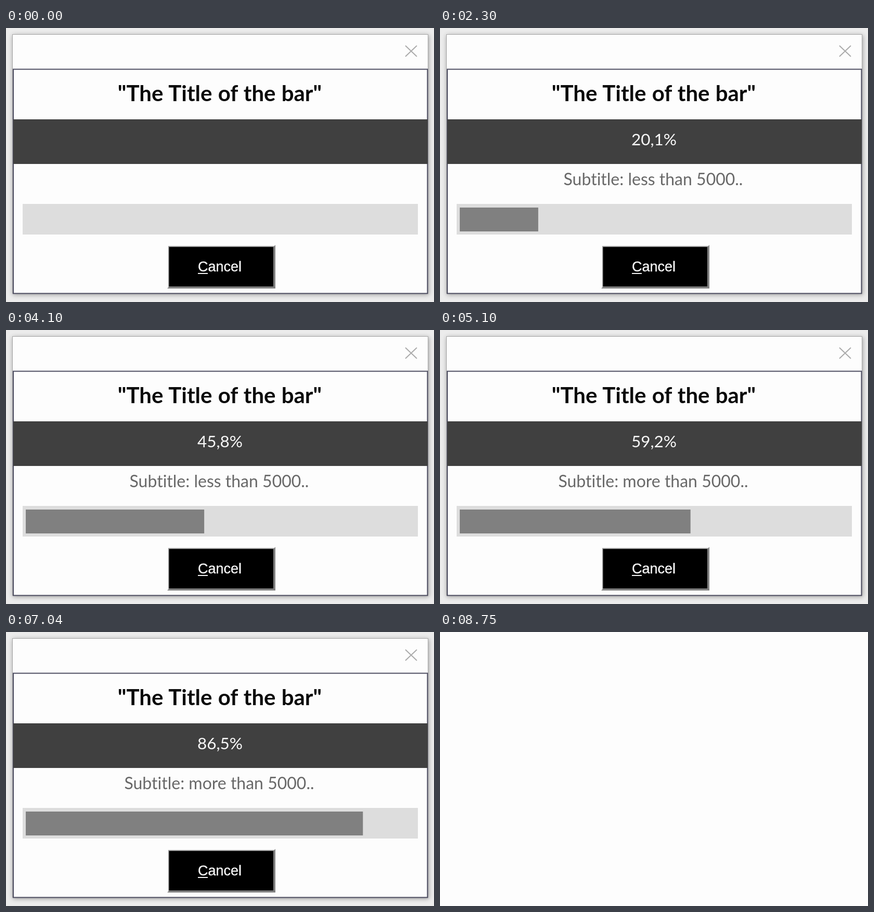
Write an HTML page that moves like this. It is 823x528 px and loops after 9050 ms.

```html
<!DOCTYPE html>
<html lang="en">
<head>
<meta charset="utf-8">
<title>Progress bar</title>
<style>
  html, body { margin: 0; width: 100%; height: 100%; overflow: hidden; background: #fdfdfd; }
  svg { display: block; width: 823px; height: 528px; }
  text { text-anchor: middle; font-family: Lato, "Open Sans", sans-serif; font-variant-ligatures: none; }
  .frame { filter: drop-shadow(1px 2px 4px #9a9a9a); }
  .title { font-size: 42px; font-weight: 700; word-spacing: 1px; fill: #0a0a0a; }
  .percent { font-size: 31.5px; fill: #f8f8f8; }
  .subtitle { font-size: 32px; fill: #686868; }
  .cancel { font: 27px "Liberation Sans", Arial, sans-serif; fill: #f4f4f4; stroke: #f4f4f4; stroke-width: .4px; }
</style>
</head>
<body>
<svg viewBox="0 0 823 528">
  <g id="dialog">
    <rect width="823" height="528" fill="#ececec"/>
    <rect class="frame" x="12" y="12" width="800" height="500" fill="#fdfdfd"/>
    <rect x="12.5" y="12.5" width="799" height="499" fill="none" stroke="#a8a8a8"/>
    <path d="M768 34L790 55M790 34L768 55" stroke="#aaaaaa" stroke-width="2"/>
    <rect x="14" y="79.5" width="796.5" height="432" fill="#fdfdfd" stroke="#4c4c60" stroke-width="2"/>
    <text class="title" x="411" y="141">"The Title of the bar"</text>
    <rect x="14" y="176" width="797" height="86" fill="#404040"/>
    <text class="percent" id="percent" x="411.5" y="226"></text>
    <text class="subtitle" id="subtitle" x="410" y="303"></text>
    <rect x="32" y="339" width="760" height="59" fill="#dddddd"/>
    <rect id="fill" x="38" y="346" width="0" height="46" fill="#808080"/>
    <rect x="312" y="420" width="203" height="79" fill="#a0a0a0"/>
    <path d="M310 502H518V418L514 422V498H314Z" fill="#808080"/>
    <rect x="313.5" y="422" width="200.5" height="76"/>
    <text class="cancel" x="411" y="469">Cancel</text>
    <rect x="369" y="472" width="19" height="2" fill="#f4f4f4"/>
  </g>
</svg>
<script>
  const LOOP = 9050, STEP = 20, START = 740, FULL_WIDTH = 749.5;
  // [time in ms, percent done]; the pace changes a little along the way
  const progress = [
    [START, 0], [1640, 10], [3080, 32.1], [5100, 59.2], [6340, 76.1], [7700, 96.3], [8200, 100]
  ];
  const $ = id => document.getElementById(id);
  const dialog = $("dialog"), percent = $("percent"), subtitle = $("subtitle"), fill = $("fill");

  function percentAt(t) {
    const i = progress.findIndex(p => p[0] > t);
    if (i < 0) return 100;
    const [t0, p0] = progress[i - 1], [t1, p1] = progress[i];
    return p0 + (p1 - p0) * (t - t0) / (t1 - t0);
  }

  function subtitleFor(p) {
    return "Subtitle: " + (p < 10 ? "less than 1000.." : p < 50 ? "less than 5000.." : "more than 5000..");
  }

  function setText(node, value) {
    if (node.textContent !== value) node.textContent = value;
  }

  function render(t) {
    const running = t >= START;
    const p = running ? percentAt(t) : 0;
    setText(percent, running ? p.toFixed(1).replace(".", ",") + "%" : "");
    setText(subtitle, running ? subtitleFor(p) : "");
    fill.setAttribute("width", p / 100 * FULL_WIDTH);
    dialog.setAttribute("opacity", t < 8690 ? 1 : t < 8720 ? 0.66 : t < 8750 ? 0.33 : 0);
  }

  const origin = performance.now();
  function tick() {
    const t = (performance.now() - origin) % LOOP;
    render(t < 8680 ? Math.floor(t / STEP) * STEP : t);
    requestAnimationFrame(tick);
  }
  tick();
</script>
</body>
</html>
```
